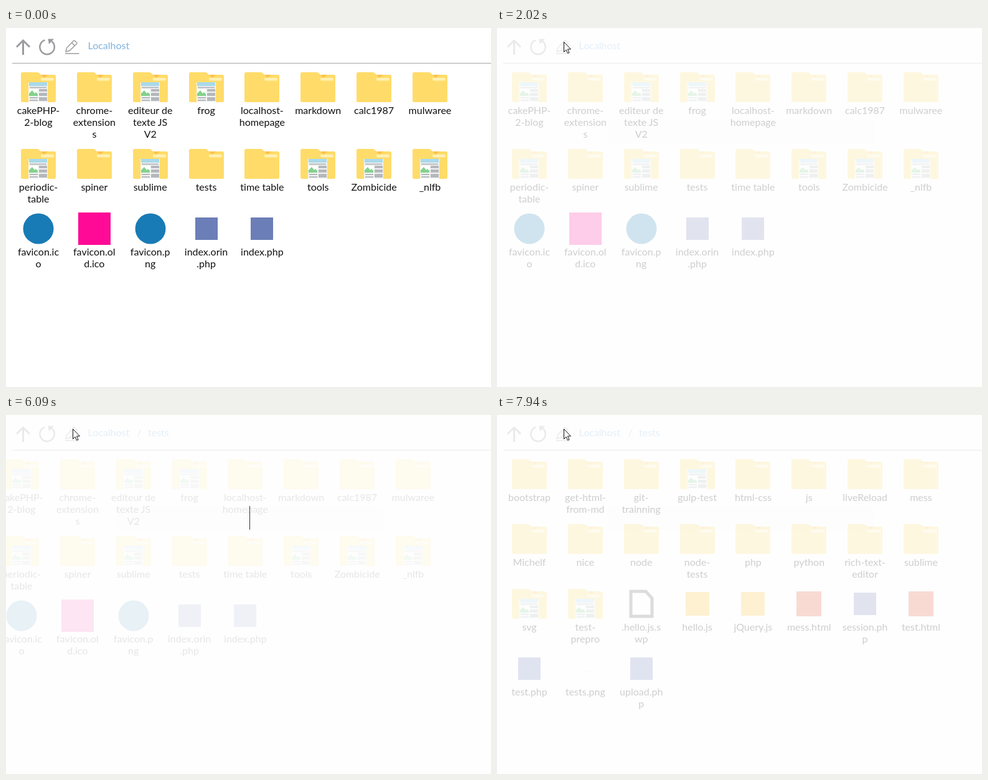
Animation, 779 px wide and 576 px high, one loop 8 s. Source, as an HTML page:

```html
<!DOCTYPE html>
<html lang="en">
<head>
<meta charset="utf-8">
<title>File browser</title>
<style>
  html, body { margin: 0; width: 100%; height: 100%; overflow: hidden; background: #fff; }
  svg { display: block; }
  .ui { font: 16px "Trebuchet MS", Lato, sans-serif; font-variant-ligatures: none; fill: #111; }
  .mid { text-anchor: middle; }
  .crumbs { fill: #7fb2e0; }
  .tools { fill: none; stroke: #9b9b9f; stroke-width: 3; }
  .query { font: 32px Roboto, sans-serif; fill: #444; }
</style>
</head>
<body>
<svg width="779" height="576" viewBox="0 0 779 576">
  <defs>
    <!-- icons are centred on 0,0 -->
    <g id="folder">
      <path fill="#ffdc69" d="M-28-21.500Q-28-24-25.500-24H-2Q0-24 1.500-22.500L4-20H25.500Q28-20 28-17.500V21.500Q28 24 25.500 24H-25.500Q-28 24-28 21.500Z"/>
      <path fill="#fdc04b" d="M4-20H15L9-15Z"/>
      <rect x="4" y="-15" width="21" height="4.500" rx="2" fill="#fff0b4"/>
    </g>
    <g id="project">
      <use href="#folder"/>
      <rect x="-16" y="-8" width="31" height="32" fill="#f3f4f4"/>
      <rect x="-15" y="-8" width="29" height="6" fill="#a9d9ea"/>
      <path stroke="#b5b8ba" stroke-width="2" d="M-14 .5H13"/>
      <rect x="-15" y="3" width="14" height="11" fill="#fff"/>
      <path fill="#82d28c" d="M-15 14V10L-10 5L-6 10L-4 8L-1 11V14Z"/>
      <path fill="#b5b8ba" d="M1 3H14V7H1ZM1 9H14V14H1ZM-14 16H-1V18H-14ZM-14 20H-1V22H-14ZM1 16H14V22H1Z"/>
    </g>
    <circle id="blue" r="24.500" fill="#197bb5"/>
    <rect id="pink" x="-26" y="-26" width="52" height="52" fill="#ff0a96"/>
    <rect id="violet" x="-18" y="-18" width="36" height="36" fill="#6c7eb7"/>
    <rect id="yellow" x="-19" y="-19" width="38" height="38" fill="#fcbf24"/>
    <rect id="orange" x="-20" y="-20" width="40" height="40" fill="#e44d26"/>
    <path id="page" fill="none" stroke="#555" stroke-width="5" d="M-17-20H7L17-9V20H-17Z"/>
    <path id="thumb" stroke="#ddd" stroke-width="1" stroke-dasharray="5 4 2 7" d="M-20 5H22"/>
  </defs>

  <g class="tools">
    <path d="M27.500 43V20M17 30.500L27.500 20L38 30.500"/>
    <path stroke-width="2.500" d="M73.500 21.500A11.700 11.700 0 1 1 62.500 19.400"/>
    <path fill="#9b9b9f" stroke="none" d="M67.500 17.500H77L69 26Z"/>
    <path stroke-width="1.500" d="M96 38L97.500 32L108.500 20.500Q109.500 19.500 110.500 20.500L113.500 23.500Q114.500 24.500 113.500 25.500L102 36.500ZM105.500 23.500L110.500 28.500"/>
    <path stroke-width="1.500" d="M95 41H117.500"/>
  </g>
  <path stroke="#a3a3a3" d="M10 56.500H779"/>
  <g class="ui crumbs">
    <text x="131.500" y="34">Localhost</text>
    <g id="sub"><text x="210.500" y="34">/</text><text x="228" y="34">tests</text></g>
  </g>

  <rect id="hover" width="75" fill="#e5eaf8"/>
  <g id="home" class="ui mid"></g>
  <g id="tests" class="ui mid"></g>

  <g id="veil">
    <rect width="779" height="576" fill="#fefefe" fill-opacity=".8"/>
    <rect x="177" y="146" width="429" height="38" fill="#000" fill-opacity=".004"/>
    <text id="query" class="query mid" x="391" y="176"></text>
    <rect id="caret" y="146" width="1" height="38" fill="#333"/>
  </g>
  <path id="cursor" fill="#fff" stroke="#111" stroke-linejoin="round"
    d="M.5.500V16.500L4 13L6.500 18.500L9 17.500L6.500 12H11.500Z"/>
</svg>
<script>
const $ = id => document.getElementById(id);
const LOOP = 8000;

// Each row: top edge, then "icon label", with | for a line break.
const home = [
  [67, "project cakePHP-|2-blog", "folder chrome-|extension|s", "project editeur de|texte JS|V2", "project frog",
    "folder localhost-|homepage", "folder markdown", "folder calc1987", "folder mulwaree"],
  [190, "project periodic-|table", "folder spiner", "project sublime", "folder tests",
    "folder time table", "project tools", "project Zombicide", "project _nlfb"],
  [294, "blue favicon.ic|o", "pink favicon.ol|d.ico", "blue favicon.p|ng", "violet index.orin|.php", "violet index.php"]
];
const tests = [
  [67, "folder bootstrap", "folder get-html-|from-md", "folder git-|trainning", "project gulp-test",
    "folder html-css", "folder js", "folder liveReload", "folder mess"],
  [171, "folder Michelf", "folder nice", "folder node", "folder node-|tests",
    "folder php", "folder python", "folder rich-text-|editor", "folder sublime"],
  [275, "project svg", "project test-|prepro", "page .hello.js.s|wp", "yellow hello.js",
    "yellow jQuery.js", "orange mess.html", "violet session.ph|p", "orange test.html"],
  [379, "violet test.php", "thumb tests.png", "violet upload.ph|p"]
];

function cell(item, col, top) {
  const [, icon, label] = item.match(/^(\w+) (.+)$/);
  const x = 52 + col * 89.85;
  const lines = label.split("|").map((line, i) =>
    `<text x="${x}" y="${top + 71 + i * 19}">${line}</text>`);
  return `<use href="#${icon}" x="${Math.round(x)}" y="${top + 28}"/>` + lines.join("");
}

const grid = rows => rows.map(([top, ...items]) =>
  items.map((item, col) => cell(item, col, top)).join("")).join("");

$("home").innerHTML = grid(home);
$("tests").innerHTML = grid(tests);

// Each step changes only the listed parts of the state.
const start = { cursor: null, hover: null, veil: 0, query: "", caret: 0, sub: 0, home: 1, shift: 0, tests: 0 };
const steps = [
  [200, { cursor: [416, 342], hover: [374, 294, 75] }],
  [420, { cursor: [153, 50], hover: [104, 67, 113] }],
  [620, { cursor: [107, 3], hover: null }],
  [830, { cursor: [101, 27] }],
  [1390, { cursor: [107, 22] }],
  [1610, { veil: .1, caret: 1 }],
  [1810, { veil: 1 }],
  [2020, { caret: 0 }],
  [2650, { query: "tes", caret: 1 }],
  [2850, { query: "test" }],
  [3450, { query: "tests" }],
  [4690, { caret: 0 }],
  [5890, { query: "", caret: 1, sub: 1 }],
  [6090, { home: .5, shift: -27 }],
  [6310, { home: 0 }],
  [6710, { tests: 1 }],
  [7940, { caret: 0 }]
];

const show = (id, alpha) => $(id).setAttribute("opacity", alpha);

function draw(now) {
  const t = now % LOOP;
  const s = Object.assign({}, start, ...steps.filter(([at]) => at <= t).map(([, change]) => change));

  for (const id of ["veil", "caret", "sub", "home", "tests"]) show(id, s[id]);
  show("cursor", s.cursor ? 1 : 0);
  show("hover", s.hover ? 1 : 0);
  if (s.cursor) $("cursor").setAttribute("transform", `translate(${s.cursor})`);
  if (s.hover) ["x", "y", "height"].forEach((key, i) => $("hover").setAttribute(key, s.hover[i]));
  $("home").setAttribute("transform", `translate(${s.shift})`);

  const query = $("query");
  if (query.textContent !== s.query) query.textContent = s.query;
  const half = s.query ? query.getComputedTextLength() / 2 : 0;
  $("caret").setAttribute("x", Math.round(391 + half));
}

const begin = performance.now();
function tick() {
  draw(performance.now() - begin);
  requestAnimationFrame(tick);
}
tick();
</script>
</body>
</html>
```
